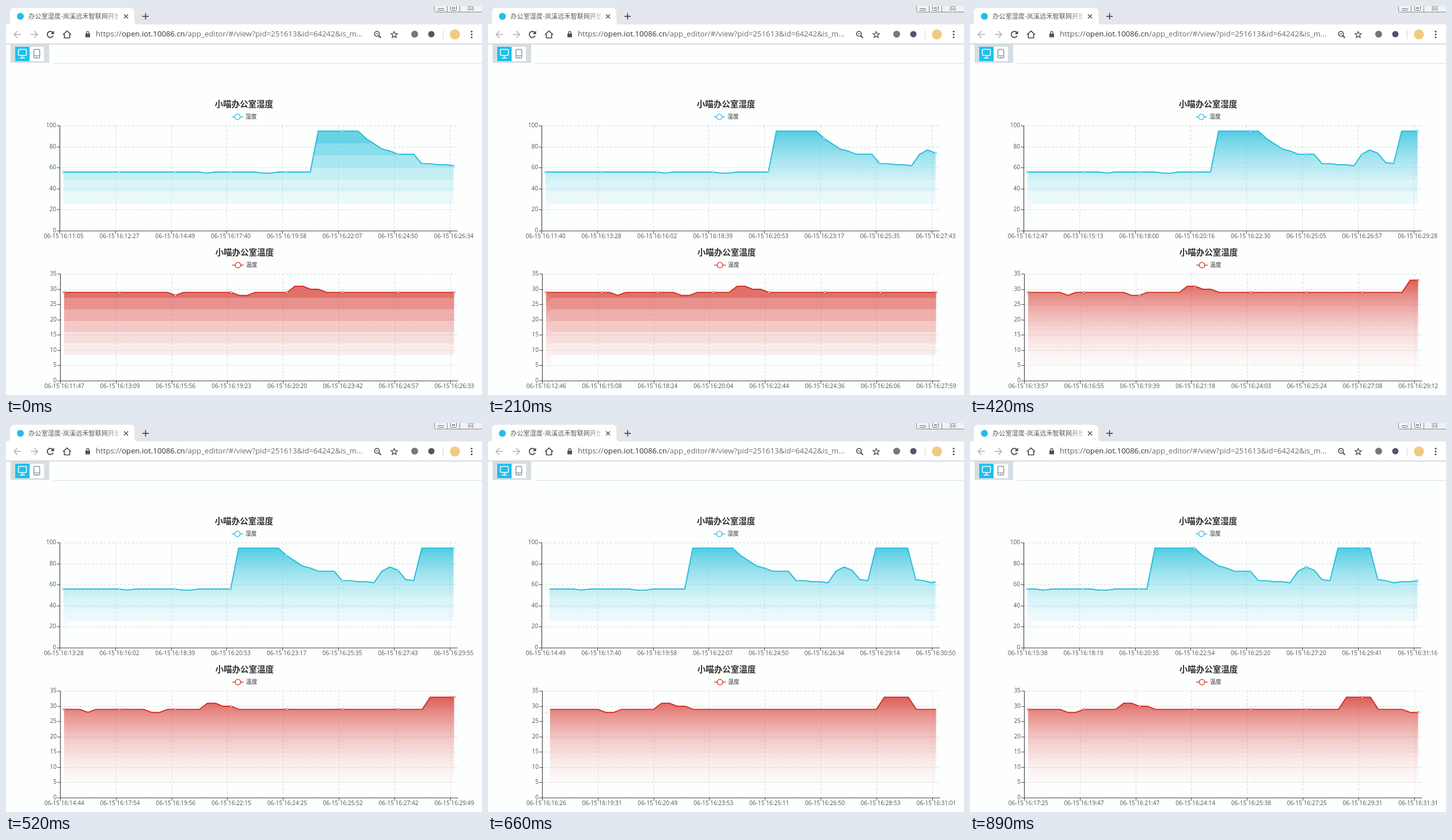
Animation of 827x677 px, one loop 940 ms. Source, as an HTML page with a canvas:

```html
<!DOCTYPE html>
<html lang="zh">
<head>
<meta charset="utf-8">
<title>办公室湿度</title>
<style>
html, body { margin: 0; width: 100%; height: 100%; overflow: hidden; background: #fdfefe; }
canvas { display: block; }
</style>
</head>
<body>
<canvas id="stage" width="827" height="677"></canvas>
<script>
const ctx = document.getElementById('stage').getContext('2d');
const LOOP = 940, COUNT = 50, EVERY = 7, STEP = 13.83;
const SLIDE = 0.28;  // share of each scroll step spent half way
const BAND = 0.121;  // height of one flat colour band, as a share of the area
const BANDS = 6;
const SANS = '"Open Sans", "Noto Sans", "Noto Sans CJK SC", "Noto Sans CJK", sans-serif';
const CJK = '"Noto Sans CJK SC", "Noto Sans CJK", "Noto Sans", sans-serif';

// Linear interpolation through [x, y] key points.
function along(keys, x) {
  const i = keys.findIndex(key => key[0] >= x);
  if (i < 0) return keys[keys.length - 1][1];
  if (i === 0) return keys[0][1];
  const [x0, y0] = keys[i - 1], [x1, y1] = keys[i];
  return y0 + (y1 - y0) * (x - x0) / (x1 - x0);
}

const humidity = {
  title: '小喵办公室湿度', name: '湿度', rgb: [32, 190, 217],
  left: 93, top: 208.5, bottom: 391.5, max: 100, tick: 20, titleY: 170, legendY: 192.5,
  levels: [[0, 56], [31, 56], [32, 95], [37, 95], [38, 88], [40, 78], [42, 73], [44, 73], [45, 64], [49, 62],
    [50, 73], [51, 77], [52, 74], [53, 65], [54, 64], [55, 95], [59, 95], [60, 65], [62, 62], [65, 64]],
  dips: [18, 25, 26],
  clock: ['11:05', '12:27', '14:49', '17:40', '19:58', '22:07', '24:50', '26:34', '29:14', '30:50', '32:20'],
  scroll: [[0, 0], [300, 5.5], [660, 14.05], [LOOP, 16.95]],
  smoothBands: n => n > 0 ? 4 : 0
};

const temperature = {
  title: '小喵办公室温度', name: '温度', rgb: [212, 46, 36],
  left: 94, top: 466.5, bottom: 652.5, max: 35, tick: 5, titleY: 428, legendY: 450.5,
  levels: [[0, 29], [28, 29], [29, 31], [30, 31], [31, 30], [32, 30], [33, 29], [56, 29], [57, 33], [60, 33],
    [61, 29], [64, 29], [65, 28]],
  dips: [14, 22, 23],
  clock: ['11:47', '13:09', '15:56', '19:23', '20:20', '23:42', '24:57', '26:33', '28:34', '30:46', '32:30'],
  scroll: [[0, 0], [300, 7.6], [420, 9.4], [660, 15.05], [LOOP, 17.95]],
  smoothBands: n => n > 7 ? 7 : 0
};

const reading = (chart, i) => Math.round(along(chart.levels, i)) - chart.dips.includes(i);

// The clock is known at every seventh reading.
function timeLabel(chart, i) {
  const keys = chart.clock.map((time, k) => {
    const [min, sec] = time.split(':').map(Number);
    return [k * EVERY, min * 60 + sec];
  });
  const s = Math.round(along(keys, i));
  const pad = v => String(v).padStart(2, '0');
  return `06-15 16:${pad(Math.floor(s / 60))}:${pad(s % 60)}`;
}

function text(str, x, y, font, color, align = 'left') {
  ctx.font = font;
  ctx.fillStyle = color;
  ctx.textAlign = align;
  ctx.textBaseline = 'middle';
  ctx.fillText(str, x, y);
}

function stroke(points, color, width = 1, dash = []) {
  ctx.beginPath();
  points.forEach(([x, y]) => ctx.lineTo(x, y));
  ctx.setLineDash(dash);
  ctx.strokeStyle = color;
  ctx.lineWidth = width;
  ctx.stroke();
  ctx.setLineDash([]);
}

function rect(x, y, w, h, color) {
  ctx.fillStyle = color;
  ctx.fillRect(x, y, w, h);
}

function paint(fill, line, width) {
  if (fill) { ctx.fillStyle = fill; ctx.fill(); }
  if (line) { ctx.strokeStyle = line; ctx.lineWidth = width; ctx.stroke(); }
}

function circle(x, y, r, fill, line, width = 1) {
  ctx.beginPath();
  ctx.arc(x, y, r, 0, 7);
  paint(fill, line, width);
}

function roundBox(x, y, w, h, r, fill, line, width = 1.5) {
  ctx.beginPath();
  ctx.roundRect(x, y, w, h, r);
  paint(fill, line, width);
}

function cross(x, y, rx, ry, color, width) {
  stroke([[x - rx, y - ry], [x + rx, y + ry]], color, width);
  stroke([[x + rx, y - ry], [x - rx, y + ry]], color, width);
}

function drawTabs() {
  rect(0, 0, 827, 33, '#e3e6ea');
  rect(0, 32, 827, 34, '#fff');
  ctx.beginPath();
  ctx.moveTo(0, 33);
  ctx.quadraticCurveTo(7, 33, 7, 25);
  ctx.lineTo(7, 11);
  ctx.quadraticCurveTo(7, 3, 15, 3);
  ctx.lineTo(215, 3);
  ctx.quadraticCurveTo(223, 3, 223, 11);
  ctx.lineTo(223, 25);
  ctx.quadraticCurveTo(223, 33, 230, 33);
  paint('#fff');
  circle(25, 18, 6, '#25bde8');

  ctx.save();
  ctx.beginPath();
  ctx.rect(38, 5, 157, 26);
  ctx.clip();
  const fade = ctx.createLinearGradient(172, 0, 196, 0);
  fade.addColorStop(0, '#55585c');
  fade.addColorStop(1, '#c8cacc');
  text('办公室湿度-岚溪远禾智联网开放', 39, 18, '11.2px ' + CJK, fade);
  ctx.restore();

  cross(208.5, 18, 3.5, 3.5, '#505357', 1.5);
  stroke([[237, 18], [248, 18]], '#45484c', 1.7);
  stroke([[242.5, 12.5], [242.5, 23.5]], '#45484c', 1.7);

  roundBox(744.5, -5, 90, 15.5, 3, '#f0f2f4', '#85888c', 1);
  for (const x of [766.5, 788.5]) stroke([[x, 0], [x, 10]], '#85888c');
  roundBox(750.5, 4.5, 10, 3, 1, '#fff', '#66696d', 1);
  roundBox(772.5, -1, 10, 8.5, 1, '#fff', '#66696d', 1);
  roundBox(775.5, 2.5, 4, 2, 0, '#fff', '#66696d', 1);
  cross(807.5, 3, 4.5, 4, '#75787c', 3.4);
  cross(807.5, 3, 4, 3.5, '#fff', 1.6);
}

function drawArrow(x, dir, color) {
  stroke([[x - 6 * dir, 49.5], [x + 6 * dir, 49.5]], color, 1.7);
  stroke([[x, 43.5], [x + 6 * dir, 49.5], [x, 55.5]], color, 1.7);
}

function drawToolbar() {
  const ink = '#45484c';
  drawArrow(20, -1, '#b3b6ba');
  drawArrow(49, 1, '#b3b6ba');

  ctx.beginPath();
  ctx.arc(77, 49.5, 5.3, 0.4, 5.5);
  paint(null, ink, 1.8);
  ctx.beginPath();
  ctx.moveTo(83.5, 43);
  ctx.lineTo(83.5, 49);
  ctx.lineTo(77.5, 49);
  paint(ink);

  stroke([[99, 50], [106, 43.5], [113, 50]], ink, 1.7);
  stroke([[101.5, 49], [101.5, 55.5], [110.5, 55.5], [110.5, 49]], ink, 1.7);

  rect(138, 48, 8, 6.5, '#505357');
  roundBox(139.8, 44.5, 4.4, 6, 2.2, null, '#505357', 1.3);

  let x = 156;
  const font = '13.18px ' + SANS;
  for (const [part, color] of [['https://', '#5c6064'], ['open.iot.10086.cn', '#303338'],
    ['/app_editor/#/view?pid=251613&id=64242&is_m...', '#6a6e72']]) {
    text(part, x, 49.5, font, color);
    x += ctx.measureText(part).width;
  }

  circle(644.5, 48.5, 4.2, null, ink, 1.6);
  stroke([[647.5, 51.5], [651.5, 55.5]], ink, 2);
  stroke([[642.5, 48.5], [646.5, 48.5]], ink, 1.2);

  const star = Array.from({ length: 11 }, (_, i) => {
    const r = i % 2 ? 2.6 : 6, a = i * Math.PI / 5 - Math.PI / 2;
    return [674.5 + r * Math.cos(a), 50 + r * Math.sin(a)];
  });
  stroke(star, ink, 1.3);

  circle(710, 49, 6, '#74777b');
  circle(739, 49, 5.5, '#53546a');
  rect(759, 42, 1, 15, '#d2d5d8');
  circle(780, 49.5, 8.7, '#efcb82');
  for (const y of [44.5, 49.5, 54.5]) circle(809, y, 1.5, ink);
  rect(0, 65.5, 827, 1.2, '#bfc2c5');
}

function drawSwitcher() {
  rect(8, 67, 67, 32, '#d6dee2');
  rect(16, 71, 25, 25, '#1dc0ee');
  rect(41, 71, 25, 25, '#fff');
  roundBox(21.5, 75.5, 14, 10.5, 1.5, null, '#fff');
  stroke([[28.5, 86], [28.5, 90]], '#fff', 1.6);
  stroke([[24, 90.5], [33, 90.5]], '#fff', 1.6);
  roundBox(48.5, 75.5, 10, 15, 1.5, null, '#8795a3');
  stroke([[49, 86.5], [58, 86.5]], '#8795a3', 1.2);
  circle(53.5, 88.6, 0.9, '#8795a3');
  rect(82, 99.5, 745, 1, '#d5dde1');
}

// Smooth for the first bands, then flat steps, then nothing.
function areaFill(chart, top, smoothBands) {
  const grad = ctx.createLinearGradient(0, top, 0, chart.bottom);
  const tint = f => {
    const [r, g, b] = chart.rgb.map(c => Math.round(c + (255 - c) * f));
    return `rgba(${r},${g},${b},${0.77 * (1 - f)})`;
  };
  const span = (from, to, c0, c1) => {
    grad.addColorStop(from, c0);
    grad.addColorStop(to, c1);
  };
  const smooth = Math.min(1, smoothBands * BAND);
  if (smooth) span(0, smooth, tint(0), tint(smooth));
  for (let i = smoothBands; i < BANDS; i++) {
    const color = tint((i + 0.5) * BAND);
    span(i * BAND, (i + 1) * BAND, color, color);
  }
  const end = Math.min(1, Math.max(smoothBands, BANDS) * BAND);
  grad.addColorStop(end, 'rgba(255,255,255,0)');
  return grad;
}

function fillArea(points, bottom, x0, x1, fill) {
  ctx.save();
  ctx.beginPath();
  ctx.rect(x0, 0, x1 - x0, 677);
  ctx.clip();
  ctx.beginPath();
  ctx.moveTo(points[0][0], bottom);
  points.forEach(([x, y]) => ctx.lineTo(x, y));
  ctx.lineTo(points[points.length - 1][0], bottom);
  paint(fill);
  ctx.restore();
}

function drawGrid(chart, n) {
  const { left, top, bottom, max, tick } = chart, right = left + STEP * COUNT;
  const small = '10.1px ' + SANS, axis = '#45484c', grid = '#d6d9dc', dash = [4, 3];
  for (let v = 0; v <= max; v += tick) {
    const y = Math.floor(bottom - (bottom - top) * v / max) + 0.5;
    if (v) stroke([[left, y], [right, y]], grid, 1, dash);
    stroke([[left - 4.5, y], [left + 0.5, y]], axis);
    text(v, left - 6, y - 0.5, small, '#505357', 'right');
  }
  for (let i = 0; i < COUNT; i += EVERY) {
    const x = Math.round(left + STEP * i) + 0.5;
    if (i) stroke([[x, top], [x, bottom]], grid, 1, dash);
    stroke([[x, bottom], [x, bottom + 5]], axis);
    text(timeLabel(chart, n + i), left + STEP * (i + 0.5) + 0.3, bottom + 10, small, '#505357', 'center');
  }
  stroke([[left + 0.5, top], [left + 0.5, bottom]], axis, 1.2);
  stroke([[left, bottom], [right, bottom]], axis, 1.2);
}

function drawChart(chart, t) {
  const { left, top, bottom, max } = chart;
  const scroll = along(chart.scroll, t), n = Math.floor(scroll);
  const sliding = n > 0 && scroll - n < SLIDE;
  const color = `rgb(${chart.rgb})`;
  const px = i => left + STEP * (i + 0.5);
  const py = v => bottom - (bottom - top) * v / max;
  const shown = Array.from({ length: COUNT }, (_, i) => reading(chart, n + i));
  const points = shown.map((v, i) => [px(sliding ? Math.min(i + 0.5, COUNT - 1) : i), py(v)]);

  const mid = left + 320.5;
  text(chart.title, mid, chart.titleY, 'bold 14.5px ' + CJK, '#333', 'center');
  stroke([[mid - 21.5, chart.legendY + 0.5], [mid - 1.5, chart.legendY + 0.5]], color, 1.3);
  circle(mid - 11.5, chart.legendY + 0.5, 4.8, '#fff', color, 1.3);
  text(chart.name, mid + 2.5, chart.legendY - 0.5, '9.8px ' + CJK, '#333');

  drawGrid(chart, n);

  const peak = py(Math.max(...shown));
  const seam = n && !sliding ? left + 15 : 0;
  if (seam) fillArea(points, bottom, 0, seam, areaFill(chart, peak, Math.ceil(1 / BAND)));
  fillArea(points, bottom, seam, 827, areaFill(chart, peak, chart.smoothBands(n)));
  ctx.lineJoin = 'bevel';
  stroke(points, color, 1.9);
  ctx.lineJoin = 'miter';

  if (sliding) {
    circle(px(0), py(reading(chart, n - 1)), 1, `rgba(${chart.rgb},.45)`);
  } else {
    for (let i = 0; i < COUNT; i += EVERY) circle(...points[i], 1.7, '#fff', color, 0.9);
  }
}

const start = performance.now();
function frame() {
  const t = (performance.now() - start) % LOOP;
  rect(0, 0, 827, 677, '#fdfefe');
  drawTabs();
  drawToolbar();
  drawSwitcher();
  drawChart(humidity, t);
  drawChart(temperature, t);
  requestAnimationFrame(frame);
}
frame();
</script>
</body>
</html>
```
